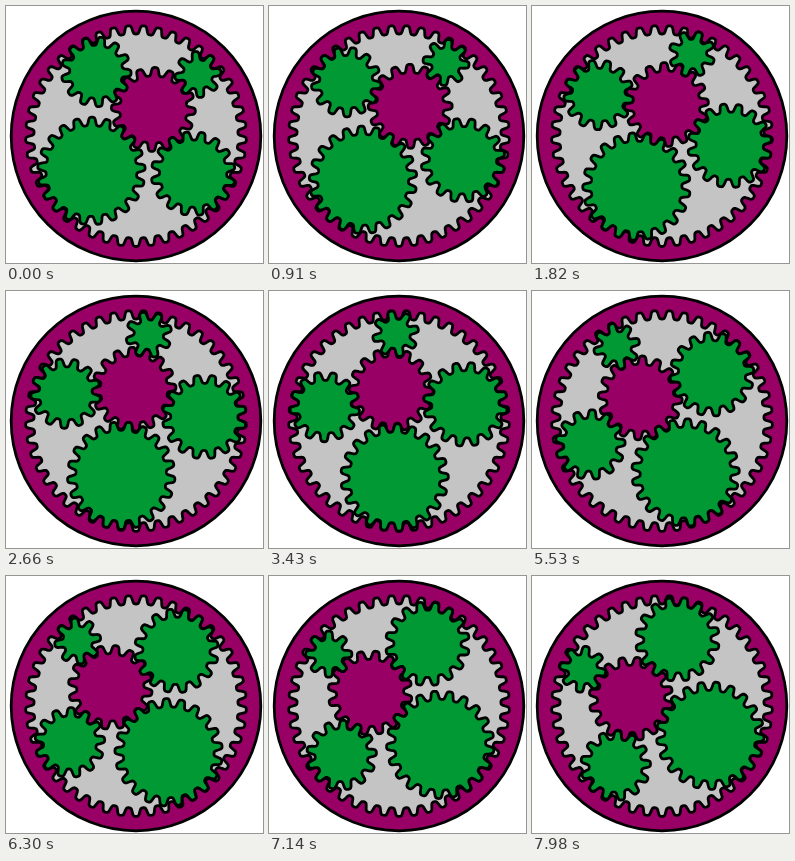
Write an HTML page with a canvas that moves like this. It is 257 by 257 pixels and loops after 8000 ms.

```html
<!DOCTYPE html>
<html lang="en">
<head>
<meta charset="utf-8">
<title>Eccentric planetary gears</title>
<style>
  html, body { margin: 0; height: 100%; overflow: hidden; background: #fff; }
  canvas { display: block; width: 100vw; height: 100vh; }
</style>
</head>
<body>
<canvas id="stage" width="257" height="257"></canvas>
<script>
const ctx = document.getElementById('stage').getContext('2d');
const PURPLE = '#990066', GREEN = '#009933', GRAY = '#c4c4c4';
const TAU = 2 * Math.PI, RAD = Math.PI / 180;
const LOOP = 8000, STEP = 70;

const CENTER = 130, RIM = 124.8;
const UNIT = 2.36;               // pitch radius per tooth
const ADDENDUM = 4.2;
const RING = 45, SUN = 16;       // tooth counts
const OFFSET = 13.459;           // sun eccentricity, in teeth, that lets every planet mesh
const RING_PHASE = -TAU / 4 + TAU / RING / 2;
const START = -56.8 * RAD, TURN = -0.968 * RAD;

// side: which side of the line through both centres the planet sits on
const planets = [
  { teeth: 8, side: 1 },
  { teeth: 13, side: -1 },
  { teeth: 16, side: 1 },
  { teeth: 21, side: -1 }
];

function gearPath(x, y, teeth, phase) {
  const samples = teeth * 24;
  for (let i = 0; i <= samples; i++) {
    const a = i / samples * TAU;
    const wave = Math.tanh(2 * Math.cos(a * teeth)) / Math.tanh(2);
    const r = teeth * UNIT + ADDENDUM * wave;
    const px = x + r * Math.cos(a + phase), py = y + r * Math.sin(a + phase);
    i ? ctx.lineTo(px, py) : ctx.moveTo(px, py);
  }
  ctx.closePath();
}

function paint(color) {
  ctx.fillStyle = color;
  ctx.fill();
  ctx.stroke();
}

function gear(x, y, teeth, phase, color) {
  ctx.beginPath();
  gearPath(x, y, teeth, phase);
  paint(color);
}

// Planet position from the triangle ring centre, sun centre, planet centre
function place({ teeth, side }, carrier) {
  const toRing = RING - teeth, toSun = SUN + teeth;
  const cos = (toRing ** 2 + OFFSET ** 2 - toSun ** 2) / (2 * OFFSET * toRing);
  const angle = carrier + side * Math.acos(cos);
  return {
    teeth,
    x: CENTER + UNIT * toRing * Math.cos(angle),
    y: CENTER + UNIT * toRing * Math.sin(angle),
    phase: angle - RING * (angle - RING_PHASE) / teeth
  };
}

function draw(time) {
  const carrier = START + TURN * Math.floor(time % LOOP / STEP);
  const placed = planets.map(p => place(p, carrier));
  const sunX = CENTER + UNIT * OFFSET * Math.cos(carrier);
  const sunY = CENTER + UNIT * OFFSET * Math.sin(carrier);
  const first = placed[0];
  const toFirst = Math.atan2(first.y - sunY, first.x - sunX);
  const sunPhase = toFirst -
    (Math.PI - first.teeth * (toFirst + Math.PI - first.phase)) / SUN;

  ctx.clearRect(0, 0, 257, 257);
  ctx.lineWidth = 2.8;
  ctx.lineJoin = 'round';
  ctx.beginPath();
  ctx.arc(CENTER, CENTER, RIM, 0, TAU);
  paint(PURPLE);
  gear(CENTER, CENTER, RING, RING_PHASE, GRAY);
  gear(sunX, sunY, SUN, sunPhase, PURPLE);
  for (const p of placed) gear(p.x, p.y, p.teeth, p.phase, GREEN);
}

const begin = performance.now();
function tick() {
  draw(performance.now() - begin);
  requestAnimationFrame(tick);
}
tick();
</script>
</body>
</html>
```
